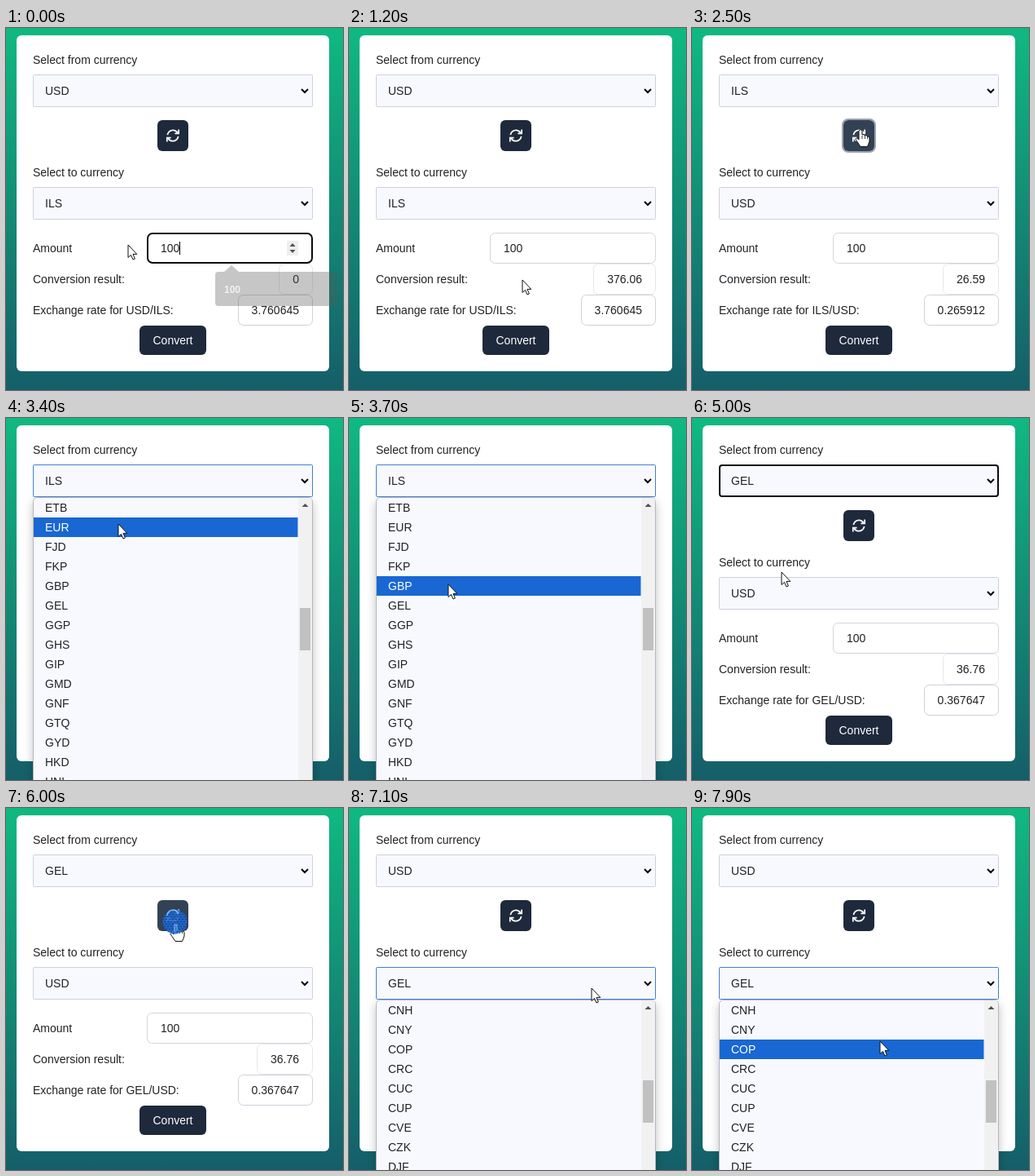
Recreate the animation shown at these times as an HTML page with a canvas. Size 414x444 px, loop 8 s.

```html
<!DOCTYPE html>
<html lang="en">
<head>
<meta charset="utf-8">
<title>Currency converter</title>
<style>
  html, body { margin: 0; width: 100%; height: 100%; overflow: hidden; }
  canvas { display: block; }
</style>
</head>
<body>
<canvas id="stage" width="414" height="444"></canvas>
<script>
const ctx = document.getElementById('stage').getContext('2d');
const LOOP = 8000, STEP = 100;
const NAVY = '#1e293b', NAVY_HOVER = '#334155', FIELD = '#f8f9fe', INK = '#202226';
const CODES = ('CNH CNY COP CRC CUC CUP CVE CZK DJF DKK DOP DZD EGP ERN ETB EUR FJD FKP ' +
  'GBP GEL GGP GHS GIP GMD GNF GTQ GYD HKD HNL HRK HTG HUF IDR ILS').split(' ');

// Pointer path: time, x, y
const PATH = [
  [0, 150, 266], [100, 150, 266], [500, 206, 380], [600, 206, 383], [1000, 213, 345],
  [1200, 213, 309], [1300, 213, 309], [1800, 180, 205], [2200, 207, 124], [2800, 207, 124],
  [3100, 150, 78], [3200, 148, 80], [3700, 122, 204], [3900, 118, 222], [4100, 118, 224],
  [4600, 117, 224], [5100, 108, 180], [5200, 108, 180], [5800, 206, 140], [6000, 208, 142],
  [6200, 208, 142], [7000, 296, 218], [7100, 298, 221], [7500, 262, 252], [7900, 231, 286]
];

// Converter values: start time, from, to, result, rate (null while loading)
const VALUES = [
  [0, 'USD', 'ILS', '0', '3.760645'],
  [700, 'USD', 'ILS', null, null],
  [1000, 'USD', 'ILS', '376.06', '3.760645'],
  [2300, 'ILS', 'USD', '26.59', '0.265912'],
  [4000, 'GEL', 'USD', null, null],
  [4800, 'GEL', 'USD', '36.76', '0.367647'],
  [6100, 'USD', 'GEL', '272', '2.72']
];

const within = (t, a, b) => t >= a && t < b;
const inside = (p, x, y, w, h) => p.x >= x && p.x < x + w && p.y >= y && p.y < y + h;

function pointerAt(t) {
  const i = PATH.findIndex(k => k[0] > t);
  if (i < 0) return { x: PATH.at(-1)[1], y: PATH.at(-1)[2] };
  const [t0, x0, y0] = PATH[i - 1], [t1, x1, y1] = PATH[i];
  const u = (t - t0) / (t1 - t0);
  return { x: Math.round(x0 + (x1 - x0) * u), y: Math.round(y0 + (y1 - y0) * u) };
}

function box(x, y, w, h, r, fill, stroke, line = 1) {
  const inset = stroke ? line / 2 : 0;
  ctx.beginPath();
  ctx.roundRect(x + inset, y + inset, w - 2 * inset, h - 2 * inset, r);
  if (fill) { ctx.fillStyle = fill; ctx.fill(); }
  if (stroke) { ctx.strokeStyle = stroke; ctx.lineWidth = line; ctx.stroke(); }
}

function text(s, x, y, color = INK, align = 'left', font = '14px') {
  ctx.font = font + ' "Liberation Sans", Arial, sans-serif';
  ctx.fillStyle = color;
  ctx.textAlign = align;
  ctx.fillText(s, x, y);
}

function lines(points, color, width) {
  ctx.beginPath();
  points.forEach(([x, y]) => ctx.lineTo(x, y));
  ctx.strokeStyle = color;
  ctx.lineWidth = width;
  ctx.stroke();
}

function triangle(x, y, w, h, color) {
  ctx.beginPath();
  ctx.moveTo(x - w / 2, y);
  ctx.lineTo(x + w / 2, y);
  ctx.lineTo(x, y + h);
  ctx.fillStyle = color;
  ctx.fill();
}

function select(y, value, open, focused) {
  if (focused) box(33, y, 344, 40, 3, FIELD, '#0b0c10', 2);
  else box(33, y, 344, 40, 1, FIELD, open ? '#3f7fd0' : '#cdd1db');
  text(value, 48, y + 25);
  lines([[363, y + 18], [367, y + 22], [371, y + 18]], '#000', 2);
}

function swapButton(hover, focused) {
  if (focused) box(184, 111, 42, 42, 7, null, '#9ca3af', 2);
  box(186, 113, 38, 38, 6, hover ? NAVY_HOVER : NAVY);
  ctx.save();
  ctx.translate(205, 132);
  for (let half = 0; half < 2; half++) {
    ctx.beginPath();
    ctx.arc(0, 0, 6.7, Math.PI * 1.04, Math.PI * 1.84);
    ctx.strokeStyle = '#fff';
    ctx.lineWidth = 1.7;
    ctx.stroke();
    lines([[7.2, -7.5], [7.2, -2.6], [2.4, -2.6]], '#fff', 1.7);
    ctx.rotate(Math.PI);
  }
  ctx.restore();
}

function output(y, value, border, t) {
  ctx.font = '14px "Liberation Sans", Arial, sans-serif';
  const w = value === null ? 50 : Math.round(ctx.measureText(value).width + 34);
  box(377 - w, y, w, 38, 6, '#fff', border);
  if (value !== null) return text(value, 360, y + 24, INK, 'right');
  const turn = (t - 4100) / 1000 * Math.PI * 2;
  ctx.beginPath();
  ctx.arc(352, y + 17, 7.6, turn + 0.75, turn + 5.7);
  ctx.strokeStyle = '#5b616b';
  ctx.lineWidth = 2;
  ctx.stroke();
}

function amount(t, pointer) {
  const focused = t < 600;
  box(173, 251, 204, 38, 6, '#fff', focused ? '#0b0c10' : '#d1d5db', focused ? 2 : 1);
  text('100', 190, 275);
  if (focused) {
    ctx.fillStyle = '#000';
    ctx.fillRect(213, 262, 1, 16);
  }
  if (focused || inside(pointer, 173, 251, 204, 38)) {
    box(345, 261, 14, 18, 0, '#efefef');
    triangle(352, 268, 7, -4, '#505050');
    triangle(352, 272, 7, 4, '#505050');
  }
}

function suggestion(t) {
  ctx.globalAlpha = Math.max(0, 1 - t / 300);
  const shade = 'rgba(90,90,90,.34)';
  triangle(277, 299, 18, -8, shade);
  box(257, 299, 150, 42, 4, shade);
  text('100', 268, 325, 'rgba(255,255,255,.75)', 'left', 'bold 12px');
  ctx.globalAlpha = 1;
}

function dropdown(top, first, thumb, pointer) {
  ctx.save();
  ctx.shadowColor = 'rgba(0,0,0,.24)';
  ctx.shadowBlur = 12;
  ctx.shadowOffsetY = 5;
  box(33, top, 344, 482, 5, FIELD);
  ctx.restore();
  box(33, top, 344, 482, 5, null, '#b4b7be');
  const active = Math.floor((pointer.y - top - 1) / 24);
  const start = CODES.indexOf(first);
  for (let row = 0; row < 20; row++) {
    const y = top + 1 + row * 24;
    if (row === active) {
      ctx.fillStyle = '#1967d2';
      ctx.fillRect(34, y, 324.5, 24);
    }
    text(CODES[start + row], 48, y + 17, row === active ? '#fff' : INK);
  }
  box(359, top + 1, 17, 480, [0, 4, 4, 0], '#f1f1f1');
  triangle(367.5, top + 12, 8, -4, '#505050');
  ctx.fillStyle = '#c1c1c1';
  ctx.fillRect(361, thumb, 13, 52);
}

function arrowCursor() {
  ctx.beginPath();
  [[0, 0], [0, 15.5], [3.5, 12.4], [6, 18], [8.4, 17], [6, 11.4], [10.8, 11.4]]
    .forEach(([x, y]) => ctx.lineTo(x, y));
  ctx.closePath();
}

function handCursor() {
  ctx.beginPath();
  ctx.moveTo(-2, 13);
  ctx.lineTo(-2, 2);
  ctx.quadraticCurveTo(0, -1, 2, 2);
  ctx.lineTo(2, 7);
  ctx.quadraticCurveTo(4, 5.5, 5.5, 8);
  ctx.quadraticCurveTo(7.5, 6.5, 8.5, 9);
  ctx.quadraticCurveTo(11, 8.5, 11, 11);
  ctx.lineTo(11, 15);
  ctx.quadraticCurveTo(10, 18, 8.5, 21.5);
  ctx.lineTo(0, 21.5);
  ctx.quadraticCurveTo(-3, 17, -6, 12.5);
  ctx.quadraticCurveTo(-5, 9.5, -2, 13);
  ctx.closePath();
}

function cursor(p, hand) {
  ctx.save();
  ctx.translate(p.x, p.y);
  hand ? handCursor() : arrowCursor();
  ctx.fillStyle = '#fff';
  ctx.fill();
  ctx.strokeStyle = '#111';
  ctx.lineWidth = 1;
  ctx.stroke();
  if (hand) [2, 5.5, 8.5].forEach(x => lines([[x, 8], [x, 12]], '#111', 0.8));
  ctx.restore();
}

function clickGlow() {
  ctx.save();
  ctx.beginPath();
  ctx.arc(207.5, 139.5, 15, 0, Math.PI * 2);
  ctx.clip();
  ctx.fillStyle = 'rgba(28,104,210,.88)';
  ctx.fillRect(190, 122, 36, 36);
  ctx.fillStyle = 'rgba(20,48,100,.7)';
  for (let y = 124; y < 156; y += 3)
    for (let x = 192 + y % 2 * 2; x < 224; x += 4) ctx.fillRect(x, y, 2, 1);
  ctx.beginPath();
  ctx.arc(205, 132, 7, Math.PI, Math.PI * 1.9);
  ctx.strokeStyle = '#8dbcf5';
  ctx.lineWidth = 1.6;
  ctx.stroke();
  lines([[207, 152], [207, 143], [210, 143], [210, 150]], '#8dbcf5', 1);
  ctx.restore();
}

function draw(t) {
  const pointer = pointerAt(t);
  const [, from, to, result, rate] = VALUES.findLast(v => v[0] <= t);
  const fromOpen = within(t, 3200, 4000), toOpen = t >= 7100;
  const onSwap = !fromOpen && inside(pointer, 186, 113, 38, 38);
  const onConvert = !fromOpen && !toOpen && inside(pointer, 164, 365, 82, 36);

  const sky = ctx.createLinearGradient(0, 0, 0, 444);
  sky.addColorStop(0, '#10b981');
  sky.addColorStop(1, '#155e69');
  ctx.fillStyle = sky;
  ctx.fillRect(0, 0, 414, 444);
  box(13, 9, 384, 412, 6, '#fff');

  text('Select from currency', 33, 44);
  text('Select to currency', 33, 182);
  swapButton(onSwap, within(t, 2200, 3200) || within(t, 6100, 7100));
  text('Amount', 33, 275);
  amount(t, pointer);
  text('Conversion result:', 33, 313);
  output(289, result, '#e5e7eb', t);
  text(`Exchange rate for ${from}/${to}:`, 33, 351);
  output(327, rate, '#cdd1da', t);
  box(164, 365, 82, 36, 6, onConvert ? NAVY_HOVER : NAVY);
  text('Convert', 205, 388, '#fff', 'center');

  // A list opens beneath its own select, but covers everything else.
  if (toOpen) dropdown(235, 'CNH', 334, pointer);
  select(195, to, toOpen, false);
  if (fromOpen) dropdown(97, 'ETB', 233, pointer);
  select(57, from, fromOpen, within(t, 4000, 6000));

  if (t < 300) suggestion(t);
  cursor(pointer, onSwap || onConvert);
  if (within(t, 5900, 6100)) clickGlow();
}

const begin = performance.now();
function tick() {
  const t = (performance.now() - begin) % LOOP;
  draw(Math.floor(t / STEP) * STEP);
  requestAnimationFrame(tick);
}
tick();
</script>
</body>
</html>
```
